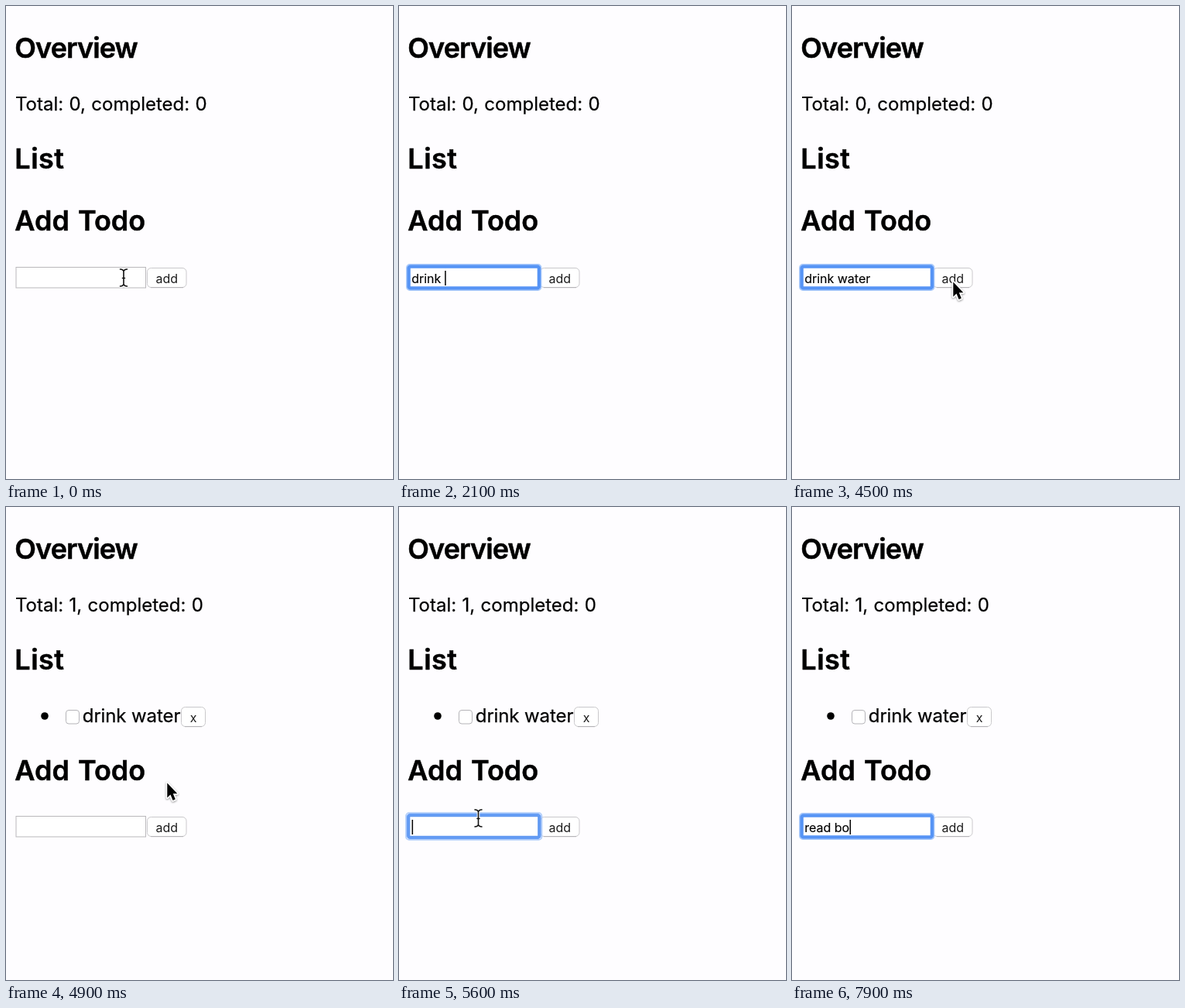
An HTML page for the animation above (8000 ms loop, 500 px wide and 611 px high).

```html
<!DOCTYPE html>
<html lang="en">
<head>
<meta charset="utf-8">
<title>Todo list</title>
<style>
  html, body { margin: 0; width: 100%; height: 100%; overflow: hidden; background: #fefdff; }
  svg { display: block; width: 500px; height: 611px; font: 24px Inter, "Open Sans", sans-serif; }
  text { white-space: pre; }
  .heading { font-size: 36px; font-weight: 600; stroke: #000; stroke-width: .5; word-spacing: 2px; }
  .body { stroke: #000; stroke-width: .25; }
  .small { font-size: 16px; stroke: #000; stroke-width: .15; }
  .label { font-size: 16px; text-anchor: middle; fill: #1c1c1c; }
  .button { fill: #fff; stroke: #c9c8cb; }
  .edge { stroke: #b2b1b4; fill: none; }
  .pointer { paint-order: stroke; stroke: #fff; stroke-linejoin: round; filter: drop-shadow(0 1px 1px #0006); }
</style>
</head>
<body>
<svg viewBox="0 0 500 611">
  <defs>
    <linearGradient id="pressed" x2="0" y2="1">
      <stop stop-color="#6cb1fa"/><stop offset="1" stop-color="#1a6df2"/>
    </linearGradient>
  </defs>

  <text class="heading" x="11.3" y="67" letter-spacing="-.9">Overview</text>
  <text id="summary" class="body" x="12" y="134.5" word-spacing=".6"></text>
  <text class="heading" x="11.3" y="210" letter-spacing=".5">List</text>

  <g id="item">
    <circle cx="50" cy="270" r="4.8"/>
    <rect x="77.5" y="262.5" width="17" height="17.5" rx="3.5" fill="#fff" stroke="#b5b4b8"/>
    <text class="body" x="98.8" y="278" letter-spacing="-.1">drink water</text>
    <rect class="button" x="226.5" y="258.5" width="31" height="25" rx="5"/>
    <path class="edge" d="M231 283.7H253"/>
    <text class="label" x="242" y="277.5">x</text>
  </g>

  <text id="formTitle" class="heading" x="11.3" y="290">Add Todo</text>

  <g id="form">
    <rect x="13" y="337.5" width="167.5" height="26.5" fill="#fff" stroke="#b9b8bb"/>
    <rect id="addButton" class="button" x="182.5" y="338.5" width="50.5" height="25" rx="5"/>
    <path class="edge" d="M187 363.7H229"/>
    <text id="addLabel" class="label" x="207.7" y="357.5">add</text>
    <g id="ring" fill="none">
      <rect id="halo" stroke="#a9c9fa" stroke-width="1.8"/>
      <rect id="glow" stroke="#5694f5" stroke-width="4.4"/>
    </g>
    <text id="value" class="small" x="16.2" y="357.5"></text>
    <rect id="caret" y="342" width="1.5" height="19"/>
  </g>

  <g id="beam" fill="none" stroke-linecap="round">
    <path id="beamOutline" stroke="#fff" stroke-width="3.6"/>
    <path id="beamStroke" stroke="#111" stroke-width="1.6"/>
  </g>
  <path id="arrow" class="pointer" stroke-width="3.6"
        d="M0 0V19L4.2 15 7.3 22.4 10.5 21 7.5 13.8H13Z"/>
</svg>

<script>
const LOOP = 8000, STEP = 100;
const $ = id => document.getElementById(id);

// [time, text, caret visible]
const typing = [
  [0, '', 0], [400, '', 1], [800, '', 0],
  [1000, 'd', 1], [1300, 'dr', 1], [1500, 'dri', 1], [1600, 'drin', 1],
  [1800, 'drink', 1], [2000, 'drink ', 1], [2300, 'drink w', 1],
  [2500, 'drink wa', 1], [2800, 'drink wat', 1], [2900, 'drink wate', 1],
  [3000, 'drink water', 1], [3500, 'drink water', 0], [4000, 'drink water', 1],
  [4500, 'drink water', 0], [4800, '', 0],
  [5600, '', 1], [6100, '', 0],
  [6300, 'r', 1], [6500, 're', 1], [6800, 'rea', 1], [7000, 'read', 1],
  [7200, 'read ', 1], [7500, 'read b', 1], [7900, 'read bo', 1]
];

// [time, x, y, shape]
const mouse = [
  [0, 152, 351, 'beam'], [1000, 0, 0, 'none'],
  [3700, 152, 351, 'beam'], [3900, 188, 354, 'arrow'], [4100, 208.3, 356.5, 'arrow'],
  [4900, 208.3, 356.5, 'arrow'], [5200, 160, 379, 'arrow'], [5400, 112, 400, 'beam'],
  [5500, 102.5, 402, 'beam'], [6300, 0, 0, 'none']
];

const indexAt = (table, t) => table.findLastIndex(row => row[0] <= t);
const show = (node, on) => node.setAttribute('visibility', on ? 'visible' : 'hidden');
const shift = (node, x, y) => node.setAttribute('transform', `translate(${x} ${y})`);

function setBox(node, inset, radius) {
  const box = { x: 13 - inset, y: 337 - inset, width: 167.5 + inset * 2, height: 27 + inset * 2, rx: radius };
  for (const key in box) node.setAttribute(key, box[key]);
}

function drawRing(t) {
  const focused = (t >= 400 && t < 4700) || t >= 5600;
  const grow = Math.max(0, 3 - (t - (t < 4700 ? 400 : 5500)) / STEP * 1.5);
  show($('ring'), focused);
  $('ring').setAttribute('opacity', focused ? 1 - grow * 0.06 : 1);
  setBox($('glow'), 0.4 + grow * 0.3, 2);
  setBox($('halo'), 3 + grow * 0.6, 4);
}

function drawMouse(t) {
  const i = indexAt(mouse, t);
  const [start, x, y, shape] = mouse[i];
  const next = mouse[i + 1];
  const moves = next && next[3] !== 'none' && shape !== 'none';
  const k = moves ? (t - start) / (next[0] - start) : 0;
  for (const id of ['beam', 'arrow']) {
    show($(id), id === shape);
    if (id === shape) shift($(id), moves ? x + (next[1] - x) * k : x, moves ? y + (next[2] - y) * k : y);
  }
}

function render(ms) {
  const t = Math.floor(ms / STEP) * STEP;
  const added = t >= 4800, pressed = t === 4700;
  $('summary').textContent = `Total: ${added ? 1 : 0}, completed: 0`;
  show($('item'), added);
  shift($('formTitle'), 0, added ? 63 : 0);
  shift($('form'), 0, added ? 62 : 0);
  $('addButton').style.fill = pressed ? 'url(#pressed)' : '';
  $('addLabel').style.fill = pressed ? '#fff' : '';

  const [, text, caretOn] = typing[indexAt(typing, t)];
  $('value').textContent = text;
  $('caret').setAttribute('x', 16.6 + (text ? $('value').getComputedTextLength() : 0));
  show($('caret'), caretOn);
  drawRing(t);
  drawMouse(t);
}

const beamPath = 'M-4.5 -11Q-1 -11 0 -8.5Q1 -11 4.5 -11M0 -8.5V8.5M-4.5 11Q-1 11 0 8.5Q1 11 4.5 11M-1.5 .5H1.5';
for (const id of ['beamOutline', 'beamStroke']) $(id).setAttribute('d', beamPath);

const begin = performance.now();
(function tick() {
  render((performance.now() - begin) % LOOP);
  requestAnimationFrame(tick);
})();
</script>
</body>
</html>
```
